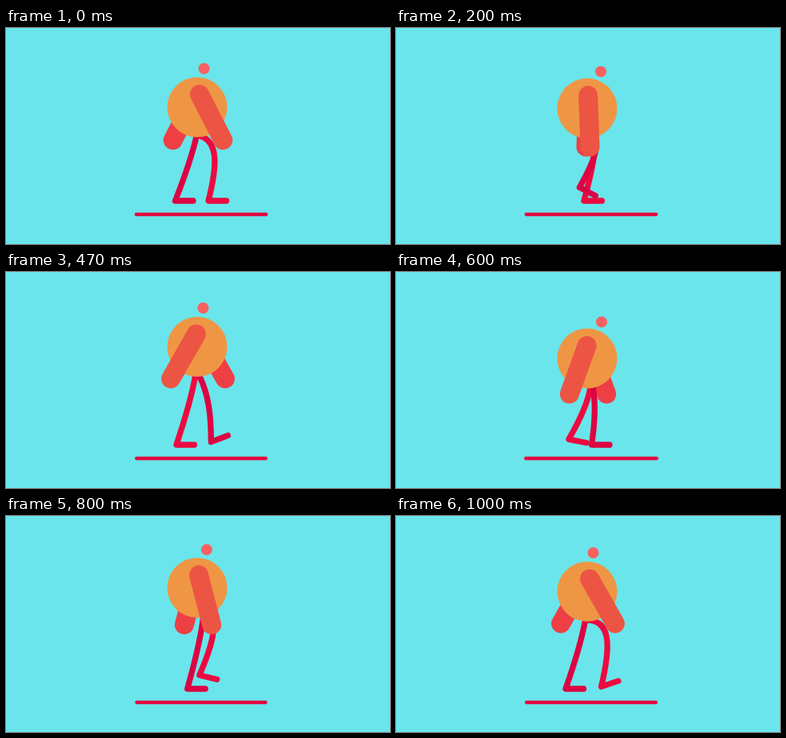
An HTML page for the animation above (1.07 s loop, 480x270 px).

```html
<!DOCTYPE html>
<html lang="en">
<head>
<meta charset="utf-8">
<title>Walk cycle</title>
<style>
  html, body { margin: 0; width: 100%; height: 100%; overflow: hidden; background: #6ae5eb; }
  svg { display: block; width: 100%; height: 100%; }
  path { fill: none; stroke-linecap: round; stroke-linejoin: round; }
  .leg { stroke-width: 7.3; }
  .arm { stroke-width: 24; }
</style>
</head>
<body>
<svg viewBox="0 0 480 270">
  <path id="ground" stroke="#e4063f" stroke-width="4.3"/>
  <path id="farArm" class="arm" stroke="#ee3f45"/>
  <path id="farLeg" class="leg" stroke="#ec0a40"/>
  <path id="nearLeg" class="leg" stroke="#dc0443"/>
  <circle id="body" cx="239" r="37.5" fill="#ef9645"/>
  <path id="nearArm" class="arm" stroke="#ec5543"/>
  <circle id="head" r="7" fill="#f96161"/>
</svg>
<script>
const LOOP = 1070, CYCLE = 16, STEP = CYCLE / 2;
const FLOOR = 216, FOOT = 22.5, ARM = 64.3, NECK = 49;

// Key points [time, value]: the torso repeats every step, the legs every cycle.
const BOB = [[0, 99], [1.1, 108], [3, 99], [5.2, 85], [7, 94]];
const LEAN = [[0, 8.5], [1.1, 18], [3, 16.5], [5.2, 8.5], [7, 7.5]];
const STRIDE = [[0, 253], [1.1, 244.5], [7, 212.5], [8, 211.5], [9.1, 216], [13.2, 249], [15, 256.5]];

const el = id => document.getElementById(id);
const rad = deg => deg * Math.PI / 180;
const mix = (a, b, k) => a + (b - a) * k;
const wave = (t, peak, period) => Math.cos(2 * Math.PI * (t - peak) / period);

// Smooth cyclic curve through key points.
function curve(keys, t, period) {
  const n = keys.length;
  const time = i => keys[(i + n) % n][0] + Math.floor(i / n) * period;
  const value = i => keys[(i + n) % n][1];
  const slope = i => (value(i + 1) - value(i - 1)) / (time(i + 1) - time(i - 1));
  t %= period;
  let i = n - 1;
  while (time(i) > t) i--;
  const span = time(i + 1) - time(i), k = (t - time(i)) / span;
  return mix(value(i), value(i + 1), k * k * (3 - 2 * k))
    + span * k * (1 - k) * (slope(i) * (1 - k) - slope(i + 1) * k);
}

// The first half of the cycle has the foot planted, the second half swings it forward.
function drawLeg(id, t, hipX, hipY, flare) {
  t %= CYCLE;
  const swing = Math.max(0, t / STEP - 1);
  const lift = 18 * Math.sin(Math.PI * swing ** 0.85) ** 1.6;
  const tilt = rad(31 * (1 - 0.3 * swing) * Math.sin(2 * Math.PI * swing ** 1.4));
  const x = curve(STRIDE, t, CYCLE), y = FLOOR - lift;
  const bend = 3 + lift / 2 + flare * Math.max(0, wave(t, 14.9, CYCLE));
  const hip = hipX + (x - 234) / 9;
  const control = (k, pull) =>
    `${mix(hip, x, k) + bend * pull} ${mix(hipY, y, k) - bend * bend * pull / 23}`;
  el(id).setAttribute('d', `M${hip} ${hipY}C${control(1 / 3, 1)} ${control(2 / 3, 0.63)} ${x} ${y}`
    + `l${FOOT * Math.cos(tilt)} ${FOOT * Math.sin(tilt)}`);
}

function drawArm(id, degrees, y) {
  const a = rad(degrees), x = 240 + degrees * 0.07;
  el(id).setAttribute('d', `M${x} ${y}l${ARM * Math.sin(a)} ${ARM * Math.cos(a)}`);
}

// Poses change 15 times per second, rounded to 10 ms.
function poseAt(ms) {
  let pose = CYCLE - 1;
  while (Math.round(pose * 20 / 3) * 10 > ms) pose--;
  return pose;
}

function render(ms) {
  const pose = poseAt(ms % LOOP);
  const t = pose - 0.25 * Math.sin(2 * Math.PI * pose / CYCLE); // slightly quicker second step
  const y = curve(BOB, t, STEP), lean = curve(LEAN, t, STEP);
  const swing = 29.7 * wave(t, -1.05, CYCLE);
  const hipX = 244.5 + 5.5 * wave(t, 3, STEP);
  const half = 81 + 0.07 * (y - 96);

  el('ground').setAttribute('d', `M${244 - half} 233h${2 * half}`);
  el('body').setAttribute('cy', y);
  el('head').setAttribute('cx', 239 + lean);
  el('head').setAttribute('cy', y - Math.sqrt(NECK * NECK - lean * lean));
  drawArm('farArm', -swing, y - 16);
  drawArm('nearArm', swing, y - 16);
  drawLeg('farLeg', t, hipX, y + 36, 20);
  drawLeg('nearLeg', t + STEP, hipX, y + 36, 3);
}

const start = performance.now();
function tick() {
  render(Math.max(0, performance.now() - start));
  requestAnimationFrame(tick);
}
tick();
</script>
</body>
</html>
```
